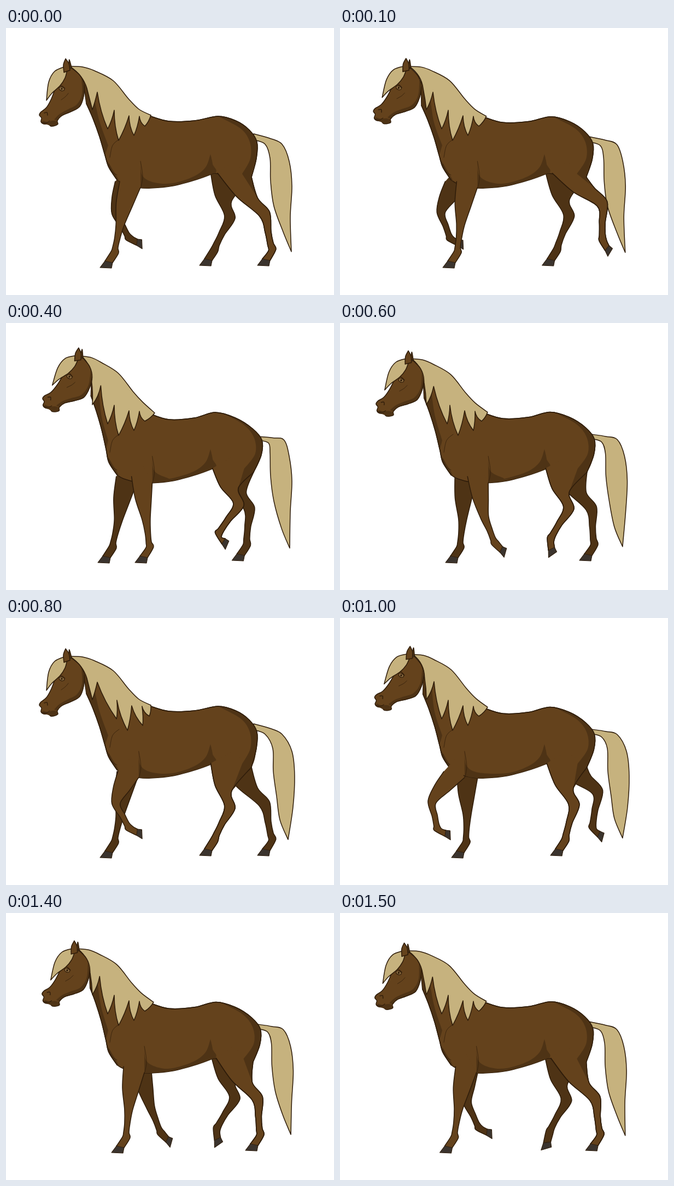
An HTML page with a canvas for the animation above (1.6 s loop, 600 by 487 pixels).

```html
<!DOCTYPE html>
<html lang="en">
<head>
<meta charset="utf-8">
<title>Walking horse</title>
<style>
html, body { margin: 0; width: 100%; height: 100%; overflow: hidden; background: #fff; }
canvas { display: block; width: 600px; height: 487px; }
</style>
</head>
<body>
<canvas id="stage" width="600" height="487"></canvas>
<script>
const ctx = document.getElementById('stage').getContext('2d');
const STEP = 100, COUNT = 16, HALF = 8;
const COAT = '#64421c', SHADE = '#4e3315', HAIR = '#c6b27e', HOOF = '#3b342e', INK = '#2e1c0a';

const add = (p, q, k = 1) => [p[0] + q[0] * k, p[1] + q[1] * k];
const mix = (p, q, k) => [p[0] + (q[0] - p[0]) * k, p[1] + (q[1] - p[1]) * k];
const unit = p => { const l = Math.hypot(...p) || 1; return [p[0] / l, p[1] / l]; };
const spin = ([x, y], deg) => {
  const a = deg * Math.PI / 180, c = Math.cos(a), s = Math.sin(a);
  return [x * c - y * s, x * s + y * c];
};
// Normal on the front side of a bone running from p to q.
const normal = (p, q) => { const d = unit(add(q, p, -1)); return [-d[1], d[0]]; };
const wave = (f, peak) => Math.cos((f - peak) / COUNT * 2 * Math.PI);

// Upper joint: a cannon bone of fixed length, leaning dx from the fetlock.
const joint = (f, dx, len) => add(f, [dx, -Math.sqrt(len * len - dx * dx)]);

// Key points of the front step: phase, fetlock x, lift.
const STRIDE = [[0, 198, 0], [4, 262, 0], [6, 283, 7], [8, 225, 25], [10, 178, 23], [12, 194, 0], [14, 219, 0], [16, 198, 0]];

function foreStep(phase) {
  const p = phase % COUNT;
  const i = STRIDE.findIndex(k => k[0] > p);
  const a = STRIDE[i - 1], b = STRIDE[i], t = (p - a[0]) / (b[0] - a[0]);
  const [x, lift] = mix(a.slice(1), b.slice(1), t);
  const fetlock = [x, 409 - lift];
  const lean = 11 + (198 - x) * .25 - lift * 1.1;
  return { fetlock, knee: joint(fetlock, lean, 51), turn: -Math.min(95, lift * 11) };
}

// Swing forward quickly in the first half, then push back along the ground.
function hindStep(phase) {
  const t = phase % COUNT / HALF, swing = t < 1, s = t - 1;
  const x = swing
    ? 486 - 96 * Math.min(1, t * 2) ** 2 - 10 * t * t
    : 380 + 106 * (s + .06 * Math.sin(Math.PI * s));
  const lift = swing ? 22 * Math.sin(Math.PI * t ** .6) : 0;
  const fetlock = [x, 405 - lift];
  const lean = (486 - x) * .4 - 13 + lift * .6;
  return { fetlock, knee: joint(fetlock, lean, 67), turn: -3.6 * lift };
}

// Smooth runs; corners lie where two runs meet.
function shape(...runs) {
  const path = new Path2D();
  runs.forEach((pts, r) => {
    if (r) path.lineTo(...pts[0]); else path.moveTo(...pts[0]);
    for (let i = 0; i < pts.length - 1; i++) {
      const p = pts[i], q = pts[i + 1], o = pts[i - 1] || p, s = pts[i + 2] || q;
      path.bezierCurveTo(...add(p, add(q, o, -1), 1 / 6), ...add(q, add(s, p, -1), -1 / 6), ...q);
    }
  });
  return path;
}

function closed(...runs) {
  const path = shape(...runs);
  path.closePath();
  return path;
}

function paint(path, fill, line = 1.5) {
  if (fill) { ctx.fillStyle = fill; ctx.fill(path); }
  if (line) { ctx.strokeStyle = INK; ctx.lineWidth = line; ctx.stroke(path); }
}

function foreTop({ knee }, far) {
  const x = (knee[0] - 209) * .45 - (far ? 5 : 0);
  return { front: [208 + x, 280], rear: [246 + x, 291], cap: [228 + x, 258] };
}

function hindTop({ knee }, bob) {
  const x = knee[0] - 407;
  return {
    front: [374 + x * .2, 265], rear: [449 + bob * 4, 272],
    cap: [415, 243], calf: [411 + x * .75, knee[1] - 29]
  };
}

function leg({ knee, fetlock, turn }, top, tone) {
  const hind = top.calf, wide = hind ? 5.5 : 5;
  const low = normal(knee, fetlock);
  const bend = unit(add(normal(mix(top.front, top.rear, .5), knee), low));
  const scale = 1 - .2 * Math.min(1, -turn / 60);
  const foot = (x, y) => add(fetlock, spin([x, y], turn), scale);
  const shin = (k, w) => add(mix(knee, fetlock, k), low, w);
  const kf = add(knee, bend, hind ? 10 : 8), kr = add(knee, bend, hind ? -10 : -7);
  const crown = [foot(-17, 16), foot(-3, 19)];
  const front = [top.front, add(mix(top.front, kf, .5), normal(top.front, kf), hind ? 5 : 3), kf,
    shin(.5, wide), shin(.85, wide), shin(1, 6), crown[0]];
  const rear = [crown[1], shin(1, -8), shin(.82, -wide), shin(.5, -wide),
    kr, hind || mix(top.rear, kr, .5), top.rear];
  paint(closed(front, rear, [top.cap]), tone, 0);
  const sides = shape(front);
  sides.addPath(shape(rear));
  paint(sides);
  paint(closed([crown[0], foot(-26, 28)], [foot(-5, 29), crown[1]]), HOOF, 1.1);
  return sides;
}

function tail(f, bob) {
  const rx = bob * 9, ry = bob * 14;
  const outer = 525.5 - 3.5 * wave(f, 2), inner = outer - 39;
  const tip = [519 + 3 * wave(f, 0), 406 + 5 * wave(f, 3)];
  paint(closed(
    [[453 + rx, 193 + ry], [482 + rx * .7, 201 + ry * .6], [505 + rx * .4, 212 + ry * .1],
      [outer - 5, 243], [outer, 288], [outer - 3, 345], tip],
    [tip, add(tip, [-15, -36]), [inner + 6, 325], [inner, 280], [inner - 1, 238],
      [474 + rx * .7, 212 + ry * .5], [453 + rx, 204 + ry * .7]]), HAIR);
}

function mane(d, sway, bob) {
  const poll = add([117, 70], d), notch = add([167, 117], d, .3);
  const end = [265 + bob * 7, 159 + bob * 5];
  const path = shape([poll, add([140, 71], d, .8), add([162, 78], d, .6),
    add([196, 96], d, .45), add([224, 129], d, .4), add([243, 148], d, .35), end]);
  const tips = [[254, 179], [234, 196], [206, 205], [186, 184]];
  const gaps = [[244, 161], [225, 160], [198, 150]].map(g => add(g, [sway * .3, 0]));
  let from = end;
  tips.forEach((tip, i) => {
    const t = add(tip, [sway * (i ? 1 : .5), 0]), gap = gaps[i] || notch;
    path.quadraticCurveTo(...add(mix(from, t, .5), [2, 2]), ...t);
    path.quadraticCurveTo(...add(mix(t, gap, .5), [-4, 3]), ...gap);
    from = gap;
  });
  path.quadraticCurveTo(notch[0] - 4, 135, 158, 149);
  path.quadraticCurveTo(...add([153, 130], d, .3), ...add([148, 110], d, .4));
  path.quadraticCurveTo(...add([141, 86], d, .8), ...poll);
  paint(path, HAIR);
}

function head() {
  const jaw = [[94, 169], [102, 160], [120, 152], [135, 143], [142, 124], [143, 104]];
  paint(closed([[113, 72], [115, 63], [116, 58], [120, 72]]), SHADE);
  paint(closed(
    [[106, 76], [93, 103], [83, 129], [74, 145], [64, 153], [61, 159], [65, 164], [64, 171], [69, 175], [78, 175]],
    [[78, 175], [82, 179], [90, 178], [95, 175], ...jaw, [135, 86], [120, 73]]), COAT);
  paint(closed([...jaw, [138, 92]],
    [[138, 92], [139, 120], [130, 139], [112, 149], [98, 157], [88, 167]]), SHADE, 0);
  paint(closed([[66, 169], [76, 171], [86, 169], [94, 171], [92, 177], [82, 178], [69, 174]]), SHADE, 0);
  paint(shape(jaw), null, 1);
  paint(shape([[65, 172], [74, 173], [80, 169]]), null, 1);
  paint(shape([[70, 155], [75, 154], [76, 159]]), null, 1.4);
  paint(shape([[101, 131], [109, 125], [114, 119]]), null, .7);
  const eye = new Path2D(), pupil = new Path2D();
  eye.ellipse(102, 111, 5, 3.4, .25, 0, 7);
  pupil.arc(102, 111, 1.8, 0, 7);
  paint(eye, '#8b6b40', 1.2);
  paint(pupil, INK, 0);
  paint(shape([[95, 108], [101, 105], [108, 110]]), null, 1);
  paint(closed([[109, 70], [89, 79], [78, 99], [74, 132]],
    [[74, 132], [84, 119], [99, 105], [108, 91], [112, 76]]), HAIR);
  paint(closed([[106, 81], [105, 67], [109, 56]], [[109, 56], [115, 65], [117, 77]]), COAT);
}

function draw(f) {
  // The body rises and falls once per step of either leg.
  const beat = f % HALF / HALF, bob = Math.sin(Math.PI * beat);
  const turn = 11 * Math.sin(Math.PI * beat ** .75);
  const sway = 17 * Math.max(0, Math.cos(Math.PI * (f - 7.5) / 5)) * (Math.abs(f - 7.5) < 3);
  const rx = bob * 9, ry = bob * 14;
  const eye = [102, 111], eyeNow = add(eye, [14 * bob, -13 * bob * bob]);
  const shift = p => add(add(eyeNow, spin(add(p, eye, -1), turn)), p, -1);
  const d = shift([117, 70]), throat = shift([147, 138]);
  const nearFore = foreStep(f), nearHind = hindStep(f);
  const farFore = foreStep(f + HALF), farHind = hindStep(f + HALF);
  const fore = foreTop(nearFore), hind = hindTop(nearHind, bob);
  const el = fore.rear[0];

  ctx.fillStyle = '#fff';
  ctx.fillRect(0, 0, 600, 487);
  ctx.lineJoin = ctx.lineCap = 'round';

  tail(f, bob);
  leg(farHind, hindTop(farHind, bob), SHADE);
  leg(farFore, foreTop(farFore, true), SHADE);

  const back = [[262, 160 + bob * 5], [298, 170 + bob * 6], [345, 169 + bob * 4], [388 - rx * .6, 161 + bob * 2],
    [420, 169 + ry * .3], [445 + rx * .7, 186 + ry * .5], [459 + rx, 208 + ry * .4],
    [458 + rx, 238 + ry * .2], hind.rear];
  const belly = [[380, 265], [350, 276], [305, 288], [265, 292], [242, 291], [215, 284], [203, 277]];
  const neck = [add([147, 138], throat), add([159, 165], throat, .75), add([171, 198], throat, .5),
    add([181, 232], throat, .25), [188, 254], [203, 277]];
  const crest = [add([140, 88], d, .8), [195, 108], [230, 143]];
  const body = closed(back, belly, [...neck].reverse(), crest);
  paint(body, COAT);

  ctx.save();
  ctx.clip(body);
  paint(closed(
    [[el, 243], [el + 4, 270], [el + 26, 282], [305, 283], [343, 271], [365, 254], [374, 230]],
    [[374, 230], [378, 248], [379, 268], [300, 300], [el, 298]]), SHADE, 0);
  paint(closed(neck.slice(0, 4), [[187, 214], add([171, 170], throat, .4), add([158, 118], d, .5),
    add([143, 100], d, .8)]), SHADE, 0);
  paint(closed([[184, 240], [192, 253], [207, 280], [190, 270]]), SHADE, 0);
  ctx.restore();
  paint(shape([[el, 243], [el + 4, 270], [el + 1, 290]]), null, .7);
  paint(shape([[207, 203], [195, 214], [190, 236]]), null, .7);
  paint(shape([[188, 248], [194, 262], [203, 268]]), null, .7);
  paint(shape(neck));

  const thigh = leg(nearHind, hind, COAT);
  paint(closed([...back.slice(3), hind.calf],
    [[432 + rx * .4, 266], [447 + rx, 238], [446 + rx * .8, 208], [430 + rx * .3, 184], [394, 164]]), SHADE, 0);
  paint(shape(back));
  paint(thigh);
  leg(nearFore, fore, COAT);

  mane(d, sway, bob);
  ctx.save();
  ctx.translate(...eyeNow);
  ctx.rotate(turn * Math.PI / 180);
  ctx.translate(-eye[0], -eye[1]);
  head();
  ctx.restore();
}

const start = performance.now();
let shown = -1;
function tick() {
  const f = Math.floor((performance.now() - start) / STEP) % COUNT;
  if (f !== shown) draw(shown = f);
  requestAnimationFrame(tick);
}
tick();
</script>
</body>
</html>
```
